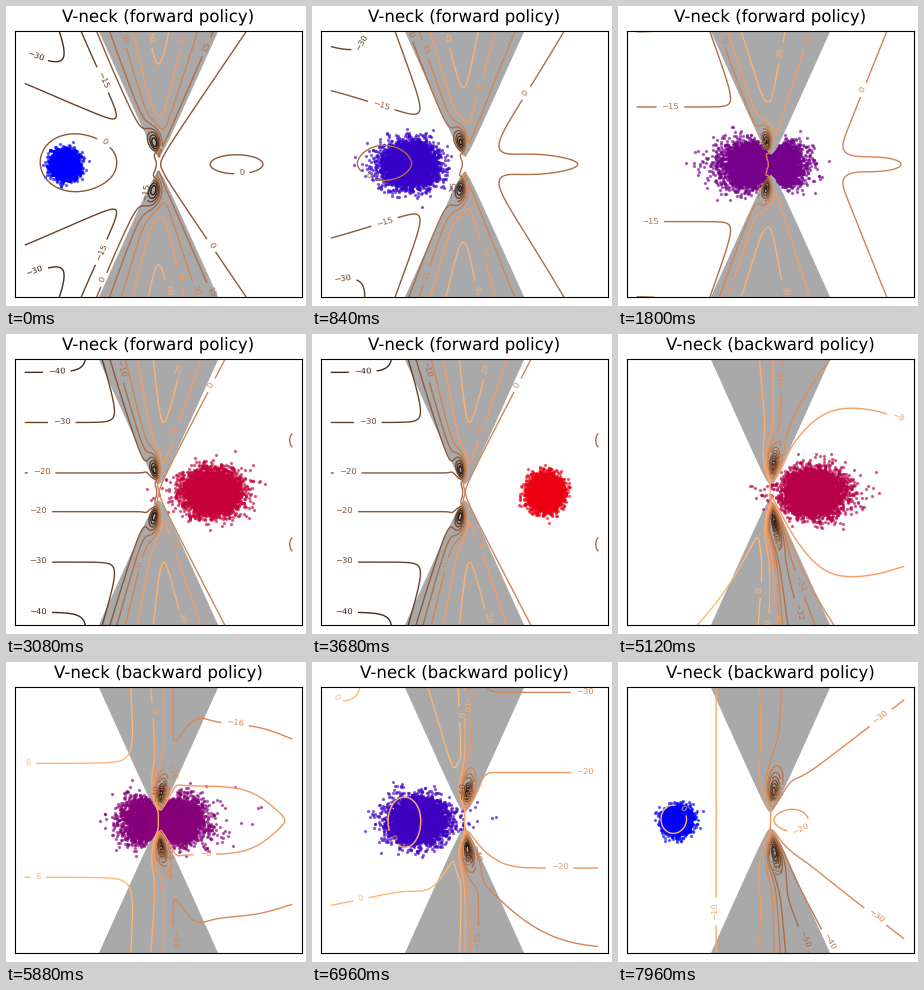
Write a matplotlib script that moves like this. It is 300 px wide and 300 px high and loops after 8000 ms.

```python
import numpy as np
import matplotlib.pyplot as plt
from matplotlib.animation import FuncAnimation

plt.rcParams["text.hinting"] = "none"

STEPS = 100          # time steps per policy
COUNT = 5000         # particles
UX, UY = 13.37, 13.3  # px per unit

# Offsets from the neck in px, and polar form: angle from the vertical, mirrored in y
axis = np.linspace(-10, 10, 160)
GX, GY = np.meshgrid(axis, axis)
X, Y = UX * GX, UY * GY
H = np.hypot(Y, 5)
R = np.hypot(X, H)
A = np.degrees(np.arctan2(X, H))
NEAR = R / (R + 25)


def bell(u):
    return np.exp(-0.5 * u ** 2)


def ramp(u):
    return 0.5 * (1 + np.tanh(u))


UP = ramp(Y / 8)
DOWN = 1 - UP


def ray(angle, left, right=None):
    """Ridge running out from the neck, with its own width on each side."""
    d = A - angle
    return NEAR * bell(d / np.where(d < 0, left, right or left))


def spot(x, y, sx, sy):
    return bell((X - x) / sx) * bell((Y - y) / sy)


def wells(angle, up, down, width=7):
    """A pair of drop-shaped dips just outside the neck."""
    def drop(r):
        return bell((A - angle) / width) * bell(np.log(R / r) / 0.33)
    return UP * drop(up) + DOWN * drop(down)


def blend(left, right, angle, width):
    w = ramp((A - angle) / width)
    return left * (1 - w) + right * w


def start():
    return (-4 + 80 * ray(0, 14) - 30 * R / 160 * bell((A + 42) / 12)
            + 16 * spot(-80, 2, 23, 19) + 7 * spot(78, 0, 25, 9)
            - 85 * wells(-9, 23, 27, 9))


def split():
    side = 0.12 * (63 + 0.4 * H - X) + 8 * spot(125, 0, 30, 9)
    return (blend(-3.5 - 0.2 * H, side, -21, 6) + 28 * ray(-2, 11)
            - 100 * wells(-9, 23, 24))


def merge():
    side = -5 - 6 * (spot(142, 52, 18, 18) + spot(142, -52, 18, 18))
    return (blend(-16 - 0.2 * H, side, -20, 6) + 34 * ray(4, 12)
            - 62 * wells(-9, 23, 25))


def leave():
    upper = 6 * ray(-12, 7) - 26 * ray(11, 7, 10)
    lower = 22 * ray(-8, 14, 6) - 90 * np.exp(-R / 250) * ray(8, 3.5, 10)
    return (-3 + UP * upper + DOWN * lower + 5 * spot(-132, 1, 30, 10)
            + 7 * spot(97, 0, 80, 50) - 75 * wells(5, 28, 33))


def pinch():
    return (blend(4 + 0.07 * H, -3.5 - 0.13 * H, 0, 14) - 8 * ray(10, 5)
            - 5 * spot(148, 3, 30, 60) - 75 * wells(5, 26, 26))


def drift():
    lower = 6 * R / 130 * bell((A + 30) / 25) - 11 * ray(15, 8, 12)
    return (blend(-4, -14 - 0.125 * H, 2, 4) + 9 * ray(-4, 10, 2) + DOWN * lower
            + 7 * spot(-60, 1, 15, 21) + 5 * spot(-120, 133, 22, 20)
            - 92 * wells(5, 27, 29))


def settle():
    trough = 2.3 - 0.23 * np.hypot(X + 104, 20)
    side = -24 - 10 * ray(20, 20, 32)
    return (blend(trough, side, 0, 3) + 8 * spot(18, 0, 20, 16)
            - 26 * DOWN * ray(8, 3, 12) + 9 * spot(-95, 1, 9, 9)
            - 70 * wells(6, 29, 31))


# per policy: (step, level spacing, landscape)
FORWARD = [(0, 15, start()), (45, 15, split()), (77, 10, merge())]
BACKWARD = [(9, 15, leave()), (47, 8, pinch()), (74, 10, drift()), (99, 10, settle())]


def field(keys, k):
    """Blend neighbouring landscapes; spacing follows the nearest one."""
    pos = np.interp(k, [key[0] for key in keys], range(len(keys)))
    i = min(int(pos), len(keys) - 2)
    w = pos - i
    return (1 - w) * keys[i][2] + w * keys[i + 1][2], keys[i + (w >= 0.5)][1]


def swarm(seed, sign):
    """Noisy bridges from one end to the other, squeezed through the neck."""
    rng = np.random.default_rng(seed)
    s = np.linspace(0, 1, STEPS)[:, None]
    q = s * (1 - s)

    def bridge():
        walk = rng.normal(0, (STEPS - 1) ** -0.5, (STEPS, COUNT))
        walk[0] = 0
        walk = walk.cumsum(axis=0)
        return walk - s * walk[-1]

    def ends():
        a, b = rng.normal(0, 0.45, (2, COUNT))
        return a * np.cos(np.pi * s / 2) + b * np.sin(np.pi * s / 2)

    lag = rng.exponential(1, COUNT) - 1
    x = 14 * s - 7 + ends() + 5 * np.sqrt(q) * bridge() - 2.2 * q * lag
    x = sign * (x + 0.35 * np.tanh(2.5 * x) * bell(x / 1.8))
    y = ends() + 1.6 * bridge()
    wall = np.sqrt(5 * x ** 2 + 0.36)
    return np.stack([x, wall * np.tanh(y / wall)], axis=-1)


POLICIES = [("forward", FORWARD, swarm(3, 1)), ("backward", BACKWARD, swarm(8, -1))]

fig = plt.figure(figsize=(3, 3), dpi=100)
ax = fig.add_axes([9 / 300, 8.7 / 300, 287 / 300, 266 / 300])
ax.set(xlim=(-10.73, 10.73), ylim=(-10, 10), xticks=[], yticks=[])
title = ax.set_title("")

wx = np.linspace(-6, 6, 100)
wy = np.sqrt(5 * wx ** 2 + 0.36)
for side in (1, -1):
    ax.fill_between(wx, side * wy, side * 15, where=wy < 15,
                    facecolor="darkgray", edgecolor="none")
dots = ax.scatter(np.zeros(COUNT), np.zeros(COUNT), s=2, alpha=0.5, linewidths=1)
lines = None


def draw(n):
    global lines
    if lines is not None:
        lines.remove()
    for label in list(ax.texts):
        label.remove()

    half, k = divmod(n, STEPS)
    name, keys, paths = POLICIES[half]
    s = k / (STEPS - 1)
    heat = 1 - s if half else s
    title.set_text(f"V-neck ({name} policy)")
    dots.set_offsets(paths[k])
    dots.set_color((heat, 0, 1 - heat))

    z, spacing = field(keys, k)
    low, high = np.floor(z.min() / spacing), np.ceil(z.max() / spacing)
    levels = spacing * np.arange(low, high + 1)
    lines = ax.contour(GX, GY, z, levels=levels, cmap="copper", linewidths=1)
    ax.clabel(lines, inline=True, fontsize=6)


anim = FuncAnimation(fig, draw, frames=2 * STEPS, init_func=lambda: None,
                     interval=40, repeat=True, repeat_delay=0)
plt.show()
```
